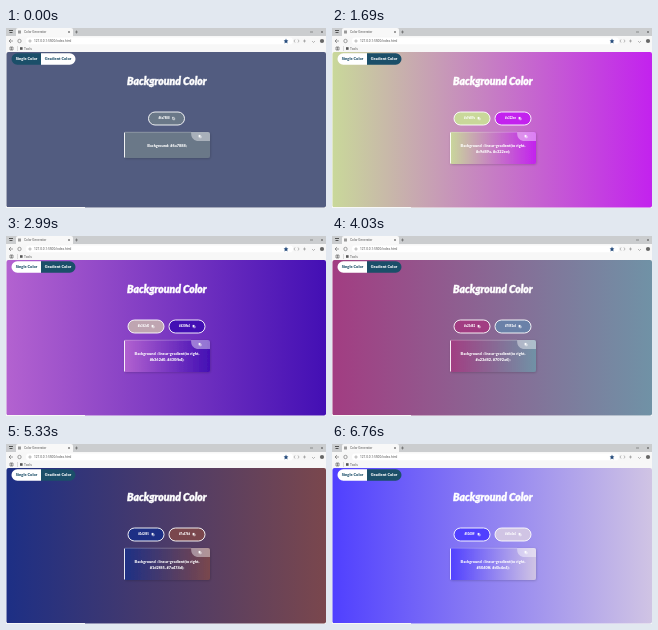
An HTML page for the animation above (6.89 s loop, 320 by 180 pixels).

```html
<!DOCTYPE html>
<html lang="en">
<head>
<meta charset="utf-8">
<style>
html, body { margin: 0; width: 100%; height: 100%; overflow: hidden; background: #fff; }
svg { display: block; width: 100vw; height: 100vh; }
text { font: 3.2px Roboto, sans-serif; fill: #555; }
.page text { font: 900 4px Lato, sans-serif; fill: #fff; text-anchor: middle; }
.page .title { font-size: 10.4px; font-style: italic; stroke: #fff; stroke-width: .4; }
.page .css { font-size: 3.9px; }
.page .hex { font-size: 2.8px; }
.icon { fill: none; stroke: #fff; stroke-width: .6; }
</style>
</head>
<body>
<svg viewBox="0 0 320 180">
  <defs>
    <linearGradient id="fade"><stop id="from"/><stop id="to" offset="1"/></linearGradient>
    <filter id="shadow" x="-10%" y="-20%" width="125%" height="150%">
      <feDropShadow dx=".5" dy=".7" stdDeviation=".8" flood-opacity=".2"/>
    </filter>
    <g id="copy" class="icon" transform="scale(.75)"><rect x="-1.5" y="-1.8" width="2.2" height="2.6"/><path d="M-.5 1.7H1.6V-.8"/></g>
    <clipPath id="pill"><rect x="5.5" y="25.2" width="64" height="11.6" rx="5.8"/></clipPath>
  </defs>

  <g class="browser">
    <rect width="320" height="8" fill="#cbcdcf"/>
    <path d="M10 8V2Q10 0 12 0H65Q67 0 67 2V8Z" fill="#f8f8f8"/>
    <rect y="8" width="320" height="172" fill="#f7f7f7"/>
    <rect x="20" y="9.5" width="267" height="6.8" rx="3.4" fill="#fff"/>
    <path d="M3 2.5h4M3.5 4.5h3" fill="none" stroke="#333" stroke-width=".8"/>
    <rect x="12" y="2.5" width="3" height="3" fill="#999"/>
    <text x="18" y="5.2">Color Generator</text>
    <path d="M62 3l2 2m0-2l-2 2M69 4h3m-1.5-1.5v3M304 4h3M315 3l2 2m0-2l-2 2M5 11l-2 2 2 2m-2-2h4"
      fill="none" stroke="#444" stroke-width=".5"/>
    <circle cx="13.5" cy="13" r="1.7" fill="none" stroke="#666" stroke-width=".6"/>
    <circle cx="24" cy="13" r="1.1" fill="none" stroke="#777" stroke-width=".5"/>
    <text x="28" y="14.2">127.0.0.1:5500/index.html</text>
    <path d="M280 10.6l.7 1.6 1.7.2-1.2 1.2.3 1.8-1.5-.9-1.5.9.3-1.8-1.2-1.2 1.7-.2z" fill="#254b7c"/>
    <path d="M289 11.5l-1 1.5 1 1.5m3-3l1 1.5-1 1.5M297 13h3m-1.5-1.5v3M306 13l1.5 1.5 1.5-1.5" fill="none" stroke="#777" stroke-width=".5"/>
    <circle cx="316" cy="13" r="2.1" fill="#666"/>
    <path d="M4 19h3v3h-3zM5.5 19v3" fill="none" stroke="#555" stroke-width=".6"/>
    <path d="M11.5 18v5" stroke="#bbb" stroke-width=".5"/>
    <rect x="14" y="19.2" width="2.6" height="2.6" fill="#555"/>
    <text x="18" y="21.8">Tools</text>
  </g>

  <g class="page">
    <rect id="page" x=".5" y="24" width="319.5" height="155.5" rx="2"/>
    <rect y="179" width="79" height="1" fill="#f7f7f7"/>
    <g clip-path="url(#pill)">
      <rect id="tab1" x="5" y="25" width="30" height="12"/>
      <rect id="tab2" x="35" y="25" width="35" height="12"/>
    </g>
    <text id="label1" x="20.5" y="32.3">Single Color</text>
    <text id="label2" x="52" y="32.3">Gradient Color</text>
    <text class="title" x="160.8" y="57">Background Color</text>
    <g id="buttons"></g>
    <rect id="card" x="118" y="104" width="86" rx="2" filter="url(#shadow)"/>
    <path d="M119 104.2H185" stroke="#fff" stroke-width=".5" stroke-opacity=".5"/>
    <rect id="edge" x="118" y="104.5" width=".9" fill="#fff"/>
    <path d="M185 104H202Q204 104 204 106V113H191Q185 112 185 104Z" fill="#fff" fill-opacity=".42"/>
    <use href="#copy" x="194" y="108.5"/>
    <text id="line1" class="css" x="161" y="118.8"></text>
    <text id="line2" class="css" x="161" y="124.8"></text>
  </g>
</svg>
<script>
const LOOP = 6890, STEP = 130, GRADIENT_START = 1690, FADE = 300;
const DARK = '#1b4f69';
const $ = id => document.getElementById(id);

// [start time, color]
const single = [[0, '#6a7888'], [650, '#ed669a']];
const left = [[1690, '#c9d89a'], [2860, '#b362d0'], [3380, '#a23d82'], [4420, '#1d2f85'], [5720, '#5040ff']];
const right = [[1690, '#c322ee'], [2600, '#430fb4'], [3770, '#7092a6'], [4940, '#7a474d'], [6240, '#d0c4e4']];
const pageFade = [[0, '#525c80'], [390, '#6a7888'], [650, '#6a7888'], [1040, '#e27080'], [1300, '#ed669a']];

const colorAt = (keys, t) => keys.findLast(k => k[0] <= t)[1];
const channels = hex => [1, 3, 5].map(i => parseInt(hex.slice(i, i + 2), 16));

function mix(a, b, p) {
  const end = channels(b);
  return `rgb(${channels(a).map((v, i) => Math.round(v + (end[i] - v) * p))})`;
}

function blendAt(keys, t) {
  const next = keys.findIndex(k => k[0] > t);
  if (next < 0) return keys.at(-1)[1];
  const [[t0, a], [t1, b]] = keys.slice(next - 1, next + 1);
  return mix(a, b, (t - t0) / (t1 - t0));
}

// Buttons fade to each new color, while the gradient itself jumps.
function buttonFill(keys, t) {
  const i = keys.findLastIndex(k => k[0] <= t);
  const [start, color] = keys[i];
  return mix(keys[Math.max(i - 1, 0)][1], color, Math.min((t - start) / FADE, 1));
}

const button = (x, keys, t) => `
  <rect x="${x}" y="84" width="36" height="13" rx="6.5" fill="${buttonFill(keys, t)}" stroke="#fff" stroke-width=".9"/>
  <text class="hex" x="${x + 15.5}" y="91.4">${colorAt(keys, t)}</text>
  <use href="#copy" x="${x + 25}" y="90.5"/>`;

function draw(now) {
  const t = Math.floor(now % LOOP / STEP) * STEP;
  const gradient = t >= GRADIENT_START;
  let pageFill, cardFill;

  if (gradient) {
    const a = colorAt(left, t), b = colorAt(right, t);
    $('from').setAttribute('stop-color', a);
    $('to').setAttribute('stop-color', b);
    pageFill = cardFill = 'url(#fade)';
    $('buttons').innerHTML = button(122, left, t) + button(163, right, t);
    $('line1').textContent = 'Background : linear-gradient(to right,';
    $('line2').textContent = `${a}, ${b});`;
  } else {
    cardFill = colorAt(single, t);
    pageFill = blendAt(pageFade, t);
    $('buttons').innerHTML = button(142.5, single, t);
    $('line1').textContent = `Background: ${cardFill};`;
    $('line2').textContent = '';
  }
  $('page').style.fill = pageFill;
  $('card').style.fill = cardFill;
  const height = gradient ? 32 : 26;
  $('card').setAttribute('height', height);
  $('edge').setAttribute('height', height - 1);
  [1, 2].forEach(n => {
    const active = gradient === (n === 2);
    $('tab' + n).style.fill = active ? DARK : '#fff';
    $('label' + n).style.fill = active ? '#fff' : DARK;
  });
}

const start = performance.now();
function tick() {
  draw(performance.now() - start);
  requestAnimationFrame(tick);
}
tick();
</script>
</body>
</html>
```
